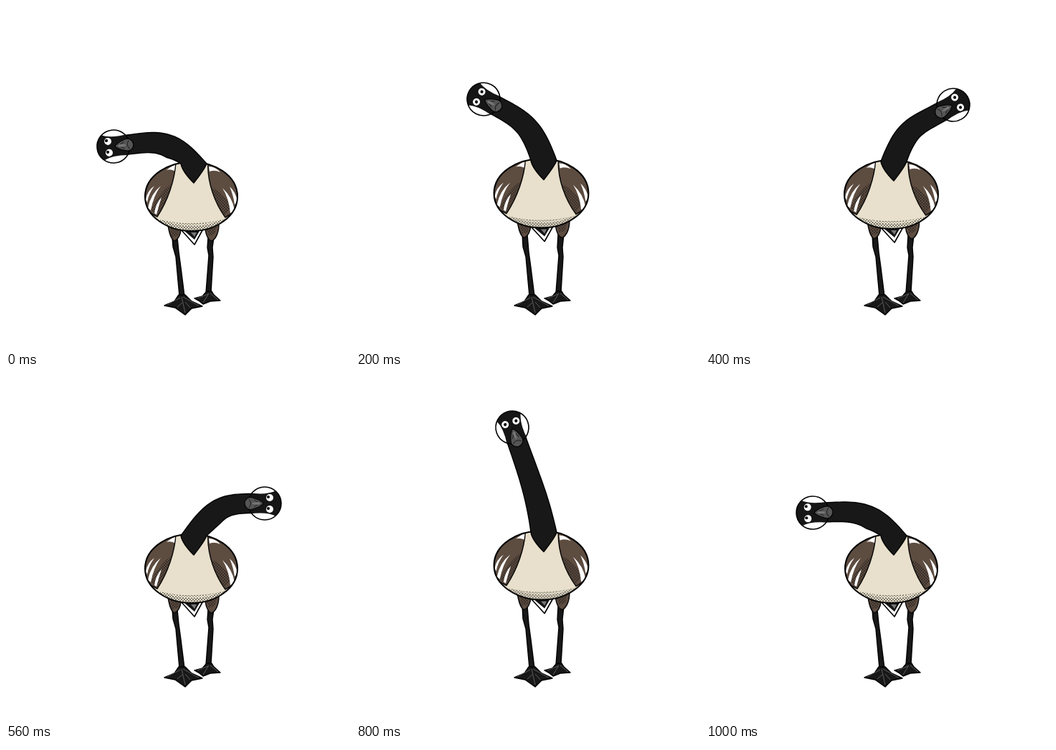
These frames come from a looping animation (480x480 px, 1.04 s). An HTML page:

```html
<!DOCTYPE html>
<html lang="en">
<head>
<meta charset="utf-8">
<title>Goose</title>
<style>
  html, body { margin: 0; width: 100%; height: 100%; overflow: hidden; background: #fff; }
  svg { display: block; width: 100%; height: 100%; }
  .ink { fill: #181818; stroke: #000; stroke-width: 1.4; stroke-linejoin: round; }
  .line { fill: none; stroke: #000; stroke-width: 1.6; stroke-linejoin: round; stroke-linecap: round; }
  .brown { fill: #5d4c40; stroke: #0a0a0a; stroke-width: 1.5; stroke-linejoin: round; }
  .white { fill: #fff; }
  .web { fill: none; stroke: #8b8b8b; stroke-width: .6; }
</style>
</head>
<body>
<svg viewBox="0 0 480 480">
  <defs>
    <pattern id="dots" width="4" height="4" patternUnits="userSpaceOnUse">
      <circle cx="1" cy="1" r=".85" fill="#111"/>
      <circle cx="3" cy="3" r=".85" fill="#111"/>
    </pattern>
    <path id="egg" d="M259 218C290 217 323 236 323 266C323 294 292 314 259 314C226 314 194 294 194 266C194 236 228 217 259 218Z"/>
    <clipPath id="eggClip"><use href="#egg"/></clipPath>
    <clipPath id="headClip"><circle r="23"/></clipPath>
  </defs>

  <path id="legL" class="ink"/>
  <path id="legR" class="ink"/>
  <g id="feet">
    <path class="ink" d="M280 398L274 405L263 408L270 412L275 416L285 412L299 411L290 403L287 398Z"/>
    <path class="web" d="M283 401L275 414M285 401L296 410M282 402L267 408"/>
    <path class="ink" d="M241 403L235 412L221 418L236 421L250 431L259 422L274 419L259 412L250 403Z"/>
    <path class="web" d="M245 406L250 428M247 406L269 418M243 407L225 417M246 414L239 420M250 413L257 421"/>
  </g>

  <g id="body">
    <path class="line white" d="M245 313L263 333L274 313Z"/>
    <path d="M249 314L263 326L270 314Z" fill="#151515"/>
    <path d="M258 316L263 322L266 316Z" fill="#777"/>
    <g id="thighs">
      <path class="brown" d="M226 306C228 317 230 325 235 328C240 326 244 319 244 311Z"/>
      <path class="brown" d="M278 311C279 319 281 326 287 328C293 325 297 316 297 304Z"/>
      <path d="M228 308L242 311L240 321L232 322ZM280 311L294 307L291 318L283 321Z" fill="url(#dots)"/>
    </g>
    <use href="#egg" fill="#e8e0cc"/>
    <g clip-path="url(#eggClip)">
      <path d="M215 298Q260 309 306 297L300 320H215Z" fill="url(#dots)"/>
      <path d="M222 300Q260 311 298 299L285 304Q260 309 235 304Z" fill="#e8e0cc"/>
      <path class="brown" d="M237 216C236 243 225 273 211 294L185 280V215Z"/>
      <path class="brown" d="M282 216C280 246 292 276 306 295L330 280V215Z"/>
      <path d="M231 248Q224 272 211 291L202 285Q212 262 231 248ZM285 252Q292 277 306 292L315 280Q301 259 285 252Z" fill="url(#dots)"/>
      <path class="white" d="M198 282Q202 262 216 251Q206 264 202 285ZM207 289Q209 275 217 267Q213 279 210 291ZM195 270Q197 258 207 251Q199 262 197 274ZM319 285Q316 267 302 254Q311 268 313 289ZM323 272Q320 259 312 252Q317 263 319 277Z"/>
      <path class="white" d="M224 229Q231 223 236 222L235 230Q229 227 224 229ZM283 224Q292 224 299 232Q291 228 284 231Z"/>
    </g>
    <use href="#egg" class="line" style="stroke-width:2"/>
  </g>

  <path id="neck" class="ink"/>

  <g id="head">
    <circle r="23" class="white"/>
    <path clip-path="url(#headClip)" d="M-18 -16Q-11 -2 -15 23H15Q11 -2 18 -16V-30H-18Z" fill="#161616"/>
    <circle r="23" class="line"/>
    <path d="M0 2C4 5 6 10 8 17C10 23 5 28 0 28C-5 28 -10 23 -8 17C-6 10 -4 5 0 2Z" fill="#555" stroke="#050505" stroke-width="1.2"/>
    <path d="M-5 15Q-2 12 -1 6M5 15Q2 12 1 6M-6 22Q0 17 6 22" fill="none" stroke="#202020"/>
    <path d="M-2 8Q0 4 2 8L1 17H-1Z" fill="#777"/>
    <circle cx="-8" cy="-7" r="5" class="white"/>
    <circle cx="8" cy="-7" r="5" class="white"/>
    <g id="pupils" fill="#0b0b0b">
      <circle cx="-8" cy="-7" r="2.1"/>
      <circle cx="8" cy="-7" r="2.1"/>
    </g>
  </g>
</svg>
<script>
const LOOP = 1040, STEP = 40;

// time, head x, head y, head tilt, neck base tilt, body lift
const poses = [
  [0, 150, 196, -97, -48, 0],
  [80, 152, 181, -88, -37, 1.2],
  [200, 178, 130, -62, -19, 4.5],
  [280, 238, 69, -18, -7, 5],
  [320, 284, 70, 18, 7, 5],
  [400, 345, 138, 60, 20, 3],
  [480, 361, 170, 82, 35, .8],
  [520, 363, 180, 91, 42, 0],
  [560, 361, 175, 90, 40, 0],
  [640, 343, 115, 52, 19, 3.8],
  [720, 296, 67, 9, 8, 4.5],
  [760, 258, 51, -4, -1, 5],
  [800, 218, 69, -19, -10, 4.5],
  [880, 168, 122, -60, -20, 4],
  [960, 149, 172, -84, -40, 1],
  [1000, 149, 188, -92, -47, 0]
];

const $ = id => document.getElementById(id);
const rad = deg => deg * Math.PI / 180;
const pt = (x, y) => x.toFixed(2) + ' ' + y.toFixed(2);

// Pose by index, continued past both ends of the loop
function poseAt(i) {
  const n = poses.length, turn = Math.floor(i / n);
  const p = poses[i - turn * n].slice();
  p[0] += turn * LOOP;
  return p;
}

// Smooth Hermite interpolation through the poses
function sample(t) {
  let i = poses.length - 1;
  while (poses[i][0] > t) i--;
  const [a, b, c, d] = [-1, 0, 1, 2].map(k => poseAt(i + k));
  const span = c[0] - b[0], u = (t - b[0]) / span, u2 = u * u, u3 = u2 * u;
  return b.map((v, k) => {
    const m0 = (c[k] - a[k]) / (c[0] - a[0]) * span;
    const m1 = (d[k] - b[k]) / (d[0] - b[0]) * span;
    return (2 * u3 - 3 * u2 + 1) * v + (u3 - 2 * u2 + u) * m0
      + (3 * u2 - 2 * u3) * c[k] + (u3 - u2) * m1;
  });
}

function neckPath(x, y, tilt, lean, lift) {
  const bx = 262, by = 220 - lift;
  const r = rad(tilt), l = rad(lean);
  const xs = [bx, bx + 54 * Math.sin(l), x - 58 * Math.sin(r), x - 12 * Math.sin(r)];
  const ys = [by, by - 54 * Math.cos(l), y + 58 * Math.cos(r), y + 12 * Math.cos(r)];
  const cubic = (p, s) => {
    const q = 1 - s;
    return q * q * q * p[0] + 3 * q * q * s * p[1] + 3 * q * s * s * p[2] + s * s * s * p[3];
  };
  const slope = (p, s) => {
    const q = 1 - s;
    return q * q * (p[1] - p[0]) + 2 * q * s * (p[2] - p[1]) + s * s * (p[3] - p[2]);
  };
  const left = [], right = [];
  for (let i = 0; i <= 24; i++) {
    const s = i / 24, k = Math.min(1, s * 3);
    const dx = slope(xs, s), dy = slope(ys, s), len = Math.hypot(dx, dy);
    // the base stays level, the rest follows the curve
    let nx = 1 - k - k * dy / len, ny = k * dx / len;
    const n = Math.hypot(nx, ny), w = 13.5 + 4.5 * (1 - s) ** 2;
    nx *= w / n;
    ny *= w / n;
    const cx = cubic(xs, s), cy = cubic(ys, s);
    left.push(pt(cx - nx, cy - ny));
    right.unshift(pt(cx + nx, cy + ny));
  }
  return `M${left.join('L')}L${right.join('L')}`
    + `Q${pt(bx + 15, by + 8)} ${pt(bx, by + 27)}Q${pt(bx - 16, by + 11)} ${left[0]}Z`;
}

function draw(t) {
  const [, x, y, tilt, lean, lift] = sample(t);
  const top = 323 - lift;
  $('legL').setAttribute('d', `M232 ${top}L233 336L237 350L242 405H249L244 365L241 343L239 ${top}Z`);
  $('legR').setAttribute('d', `M282 ${top}L281 337L283 348L279 400H286L289 350L288 337L290 ${top}Z`);
  const wide = 1 + lift * .005;
  $('body').setAttribute('transform', `translate(${259 * (1 - wide)} ${-lift}) scale(${wide} 1)`);
  $('neck').setAttribute('d', neckPath(x, y, tilt, lean, lift));
  $('head').setAttribute('transform', `translate(${pt(x, y)}) rotate(${tilt.toFixed(2)})`);
  const look = Math.max(0, Math.min(1, (Math.abs(tilt) - 65) / 25));
  $('pupils').setAttribute('transform', `rotate(${-tilt}) translate(${-2 * look} ${-look}) rotate(${tilt})`);
}

const start = performance.now();
function tick() {
  const t = (performance.now() - start) % LOOP;
  draw(Math.floor(t / STEP) * STEP);
  requestAnimationFrame(tick);
}
tick();
</script>
</body>
</html>
```
